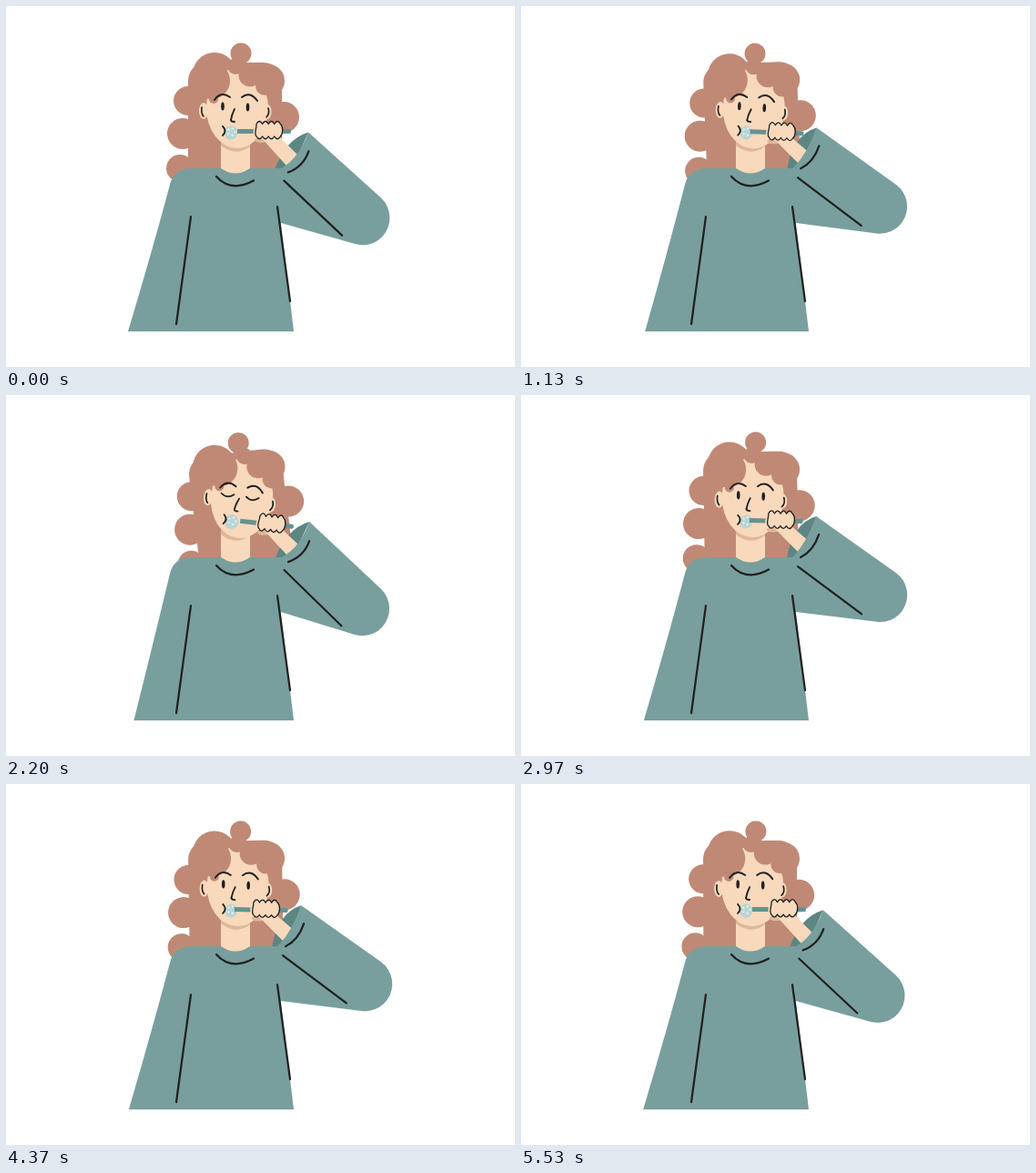
Write an HTML page with a canvas that moves like this. It is 559 px wide and 396 px high and loops after 5.61 s.

```html
<!DOCTYPE html>
<html lang="en">
<head>
<meta charset="utf-8">
<title>Brushing teeth</title>
<style>
  html, body { margin: 0; width: 100%; height: 100%; overflow: hidden; background: #fff; }
  canvas { display: block; width: 559px; height: 396px; }
</style>
</head>
<body>
<canvas id="stage" width="559" height="396"></canvas>
<script>
const ctx = document.getElementById('stage').getContext('2d');
const LOOP = 5610, SWAY = LOOP / 4, TAU = Math.PI * 2;
const TEAL = '#789f9d', INNER = '#5c8682', HAIR = '#c08976', SKIN = '#f8d9bc';
const SHADE = '#dfb898', FOAM = '#b9d5d4', BRUSH = '#65928f', INK = '#20201f';

// Curls as circles: x, y, radius.
const CURLS = [
  [258, 52, 11.5], [229, 75, 24], [288, 82, 18], [305, 122, 17],
  [200, 104, 16], [194, 140, 17], [191, 178, 15]
];
const FRINGE = [[226, 82, 20], [228, 102, 5], [252, 66, 9], [268, 76, 12.5], [284, 88, 10]];

function fill(color) { ctx.fillStyle = color; ctx.fill(); }

function ink(width) {
  ctx.strokeStyle = INK;
  ctx.lineWidth = width;
  ctx.stroke();
}

function oval(x, y, rx, ry, color) {
  ctx.beginPath();
  ctx.ellipse(x, y, rx, ry, 0, 0, TAU);
  fill(color);
}

function box(x, y, w, h, r, color) {
  ctx.beginPath();
  ctx.roundRect(x, y, w, h, r);
  fill(color);
}

function curls(list) {
  for (const [x, y, r] of list) oval(x, y, r, r, HAIR);
}

function curve(x1, y1, cx, cy, x2, y2, width = 2) {
  ctx.beginPath();
  ctx.moveTo(x1, y1);
  ctx.quadraticCurveTo(cx, cy, x2, y2);
  ink(width);
}

function line(x1, y1, x2, y2) {
  ctx.beginPath();
  ctx.moveTo(x1, y1);
  ctx.lineTo(x2, y2);
  ink(2.2);
}

// Run a drawing turned around (x, y) and shifted by (dx, dy).
function turned(x, y, angle, dx, dy, draw) {
  ctx.save();
  ctx.translate(x + dx, y + dy);
  ctx.rotate(angle);
  ctx.translate(-x, -y);
  draw();
  ctx.restore();
}

// Angle on the circle c where a line from (px, py) touches it.
function tangent(px, py, c, r, side) {
  const dx = c.x - px, dy = c.y - py;
  return Math.atan2(dy, dx) + Math.PI + side * Math.acos(r / Math.hypot(dx, dy));
}

function hair() {
  box(200, 62, 103, 134, 20, HAIR);
  curls(CURLS);
}

function neck() {
  box(236, 140, 32, 50, 0, SKIN);
  ctx.beginPath();
  ctx.moveTo(236, 146);
  ctx.lineTo(268, 146);
  ctx.lineTo(268, 154);
  ctx.quadraticCurveTo(252, 166, 236, 153);
  fill(SHADE);
}

function eye(x, y, tilt) {
  const open = Math.min(1, Math.max(0, (0.62 - tilt) / 0.16));
  if (open > 0.15) oval(x, y, 1.8, 4.6 * open, INK);
  else curve(x - 7, y - 1, x, y + 5, x + 7, y - 1, 1.7);
}

function face(tilt) {
  oval(217, 115, 5, 9, SKIN);
  oval(287, 116, 4.5, 8, SKIN);
  oval(254, 112, 34, 44, SKIN);
  curls(FRINGE);
  curve(215, 111, 214, 118, 217, 121, 1.7);
  curve(288, 112, 290, 118, 286, 122, 1.7);
  curve(229, 103, 236, 93, 246, 100);
  curve(259, 100, 268, 93, 276, 104);
  eye(238, 110, tilt);
  eye(265.5, 111, tilt);
  curve(251, 113, 248, 119, 247, 125, 1.8);
  curve(247, 125, 247, 127, 251, 127, 1.8);
}

function mouth(slide) {
  const r = 7.2 + slide * 0.1;
  oval(247, 139, r, r + 0.6, FOAM);
  for (let i = 0; i < 5; i++) {
    const a = i * TAU / 5;
    oval(247.5 + 4 * Math.cos(a), 138 + 4 * Math.sin(a), 1.2, 1.2, '#e3efee');
  }
  curve(238, 132, 243, 137, 238, 142, 1.8);
}

function handle() {
  box(254, 135, 20, 5, 0, BRUSH);
  box(298, 135, 15, 5, 2, BRUSH);
}

function knuckles(x, y, step, bulge) {
  for (let i = 0; i < 4; i++, x += step) {
    ctx.quadraticCurveTo(x + step / 2, y + bulge, x + step, y);
  }
}

function fist() {
  oval(277, 138, 5.5, 7, SKIN);
  ctx.beginPath();
  ctx.moveTo(275, 129.5);
  knuckles(275, 129.5, 6.6, -6);
  ctx.bezierCurveTo(304.5, 132, 304.5, 140, 301.4, 143);
  knuckles(301.4, 143, -6.6, 5.5);
  ctx.bezierCurveTo(272, 140, 275.5, 134, 275, 129.5);
  fill(SKIN);
  ink(1.3);
}

function cuffInside(cuff, low) {
  ctx.beginPath();
  ctx.moveTo(cuff.x, cuff.y);
  ctx.quadraticCurveTo(cuff.x - 26, cuff.y + 8, low.x - 8, low.y + 3);
  ctx.lineTo(low.x + 10, low.y + 4);
  fill(INNER);
}

function wrist(x, y, low) {
  ctx.beginPath();
  ctx.moveTo(x - 10, y + 6);
  ctx.lineTo(x + 12, y + 7);
  ctx.lineTo(low.x + 18, low.y - 14);
  ctx.lineTo(low.x + 14, low.y + 6);
  ctx.lineTo(low.x + 5, low.y - 3);
  fill(SKIN);
}

function body(tilt) {
  ctx.beginPath();
  ctx.moveTo(134 + 6.7 * tilt, 357);
  ctx.quadraticCurveTo(161 + 2 * tilt, 267, 180, 196);
  ctx.quadraticCurveTo(184, 178, 205, 178);
  ctx.lineTo(236, 178);
  ctx.quadraticCurveTo(252, 189, 268, 178);
  ctx.lineTo(304, 178);
  ctx.lineTo(302, 240);
  ctx.lineTo(316, 357);
  fill(TEAL);
}

function sleeve(d, cuff, low) {
  const elbow = { x: 394.5 - 3.2 * d, y: 219 + 15 * d }, r = 29.8;
  ctx.beginPath();
  ctx.moveTo(cuff.x, cuff.y);
  ctx.arc(elbow.x, elbow.y, r,
    tangent(cuff.x, cuff.y, elbow, r, 1), tangent(302, 238, elbow, r, -1));
  ctx.lineTo(302, 238);
  ctx.lineTo(296, 215);
  ctx.lineTo(296, 180);
  ctx.lineTo(low.x, low.y);
  ctx.quadraticCurveTo(cuff.x - 10, cuff.y + 28, cuff.x, cuff.y);
  fill(TEAL);
  curve(327 + 6 * d, 153 + 7 * d, 321 + 6 * d, 171 + 6 * d, 307 + 3 * d, 178 + 5 * d, 2.2);
  line(304 + 1.5 * d, 188 + 4 * d, 374 - 5.5 * d, 240 + 13 * d);
}

function draw(time) {
  const phase = time / SWAY;
  const tilt = (1 - Math.cos(TAU * phase)) / 2;
  const stroke = Math.cos(TAU * (3 * phase - 0.93));  // three strokes per sway
  const drop = 0.42 + 0.53 * stroke + 0.53 * tilt;
  const slide = 2.2 * (stroke - 0.9) + 5 * tilt;
  const cuff = { x: 324 + 9 * drop, y: 133 + 6 * drop };
  const low = { x: 300 + 3 * drop, y: 176 + 2 * drop };
  const grip = 0.11 * tilt;

  ctx.fillStyle = '#fff';
  ctx.fillRect(0, 0, 559, 396);
  ctx.lineCap = ctx.lineJoin = 'round';

  turned(262, 76, -0.125 * tilt, 0, 0, hair);
  neck();
  turned(250, 152, 0.11 * tilt, tilt, 0.5 * tilt, () => face(tilt));
  turned(246, 138, grip, tilt, 0, () => mouth(slide));

  cuffInside(cuff, low);
  oval(280 + slide, 147 + 4 * tilt, 7, 3, SHADE);
  wrist(289 + slide, 137 + 4.5 * tilt, low);
  body(tilt);
  sleeve(drop, cuff, low);
  turned(246, 138, grip, slide, 0, () => { handle(); fist(); });

  curve(231, 187, 247, 205, 272, 191.5, 2.2);
  line(203, 231, 187, 349);
  line(298, 220, 312, 324);
}

const start = performance.now();
function tick() {
  draw((performance.now() - start) % LOOP);
  requestAnimationFrame(tick);
}
tick();
</script>
</body>
</html>
```
